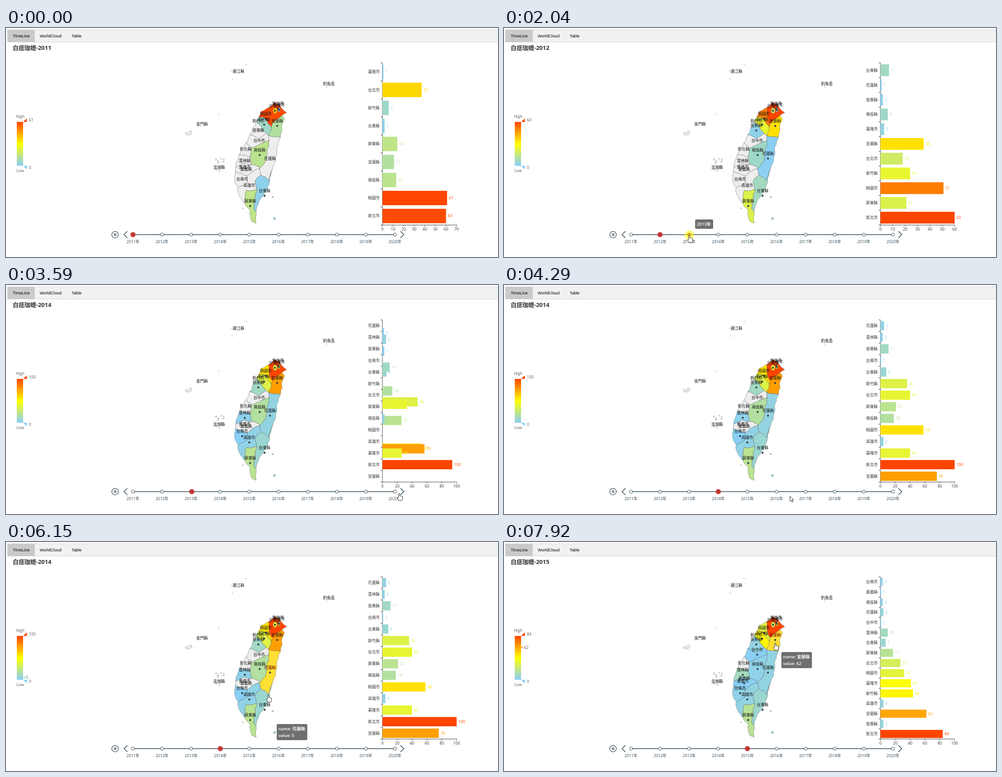
Write an HTML page that moves like this. It is 1094 by 512 pixels and loops after 8 s.

```html
<!DOCTYPE html>
<html lang="zh-Hant">
<head>
<meta charset="utf-8">
<title>Timeline map</title>
<style>
html, body { margin: 0; width: 100%; height: 100%; overflow: hidden; background: #fff; }
svg { display: block; width: 100%; height: 100%; }
text { font-family: "Open Sans", "Noto Sans CJK TC", "Noto Sans CJK SC", "Noto Sans CJK JP", sans-serif; font-size: 8.7px; }
.tab { font-family: "Liberation Sans", Arial, sans-serif; font-size: 9.3px; }
.title { font-size: 13px; font-weight: 700; }
.tip { font-size: 9.5px; font-weight: 600; }
</style>
</head>
<body>
<svg viewBox="0 0 1094 512">
  <defs><linearGradient id="scale" x1="0" y1="1" x2="0" y2="0">
    <stop stop-color="#87cefa"/><stop offset=".5" stop-color="#ff0"/><stop offset="1" stop-color="#ff4500"/>
  </linearGradient></defs>
  <g id="frame"></g><g id="year"></g><g id="bars"></g><g id="top"></g>
</svg>
<script>
const LOOP = 8000, INK = '#304654', MID = 'text-anchor="middle"';
const layer = id => document.getElementById(id);

// Start time and rows from top to bottom; the axis follows from the largest value
const years = [
  [0, '基隆1 台北37 新竹6 台東2 屏東14 宜蘭11 南投13 桃園61 新北60'],
  [500, '台東7 花蓮1 苗栗2 南投6 基隆3 宜蘭35 台北18 新竹24 桃園51 屏東21 新北60'],
  [2110, '雲林1 台南5 南投6 花蓮5 台東2 高雄1 苗栗8 宜蘭27 台北22 新竹65 屏東33 基隆5 新北85 桃園44'],
  [3511, '花蓮5 雲林3 苗栗11 台南1 台東8 新竹36 台北40 屏東21 南投18 桃園58 高雄4 基隆40 新北100 宜蘭76'],
  [7511, '台南3 嘉義1 南投3 花蓮4 台中1 雲林10 台東7 屏東17 台北27 桃園32 基隆41 新竹44 高雄4 宜蘭62 苗栗4 新北84']
].map(([start, list], i) => {
  const rows = list.split(' ').map(s => ({ name: s.slice(0, 2), value: +s.slice(2) }));
  const max = Math.max(...rows.map(r => r.value)), step = max > 80 ? 20 : 10;
  const value = Object.fromEntries(rows.map(r => [r.name, r.value]));
  return { start, rows, max, step, value, axis: Math.ceil(max / step) * step, gap: 362.5 / rows.length, label: 2011 + i };
});
// Bars created later lie on top
const paintOrder = [...new Set(years.flatMap(y => [...y.rows].reverse().map(r => r.name)))];

// Border corners, named A-Z, a-z, 0-5 in this order: the coast clockwise, then inland
const corners = `584,178 600,167 612,178 624,190 614,195 619,203 613,218 610,245 602,275 592,317 586,345 572,374 556,411
 556,437 547,433 543,408 531,392 517,372 516,358 509,344 510,320 511,311 518,284 534,256 542,238 557,208 562,199 567,187
 577,202 590,222 592,214 585,197 603,204 584,240 579,236 567,219 560,248 585,251 566,259 546,269 543,288 545,305 561,309
 564,314 580,290 570,308 567,328 583,341 555,340 558,362 551,404 537,331 537,345 535,363 529,302 580,272 553,388`
  .split(/\s+/).map(p => p.split(',').map(Number));
const names = 'ABCDEFGHIJKLMNOPQRSTUVWXYZabcdefghijklmnopqrstuvwxyz012345';

// Label place, then corners of the border or the radius of a city
const regions = {
  苗栗: [561, 229, 'ZYkij'], 台中: [563, 252, 'YXnmlhik'], 彰化: [533, 271, 'XWon'], 雲林: [531, 297, 'WV2po'],
  嘉義: [534, 316, 'VUzrqp2'], 台南: [525, 338, 'UTS0z'], 高雄: [541, 352, 'SRQ1xwurz0'], 南投: [564, 284, 'nml3strqpo'],
  新竹: [574, 216, 'aZjihdc'], 桃園: [578, 203, 'Abacdef'], 新北: [605, 180, 'ABCDEgef'], 宜蘭: [603, 219, 'EFGHhdeg'],
  花蓮: [587, 292, 'hHIJvurts3l'], 台東: [575, 375, 'uvJKLMy4xw'], 屏東: [543, 398, 'QPONMy4x1'],
  台北: [598, 185, 6.5], 基隆: [607, 183, 4.5]
};
const spots = { 新竹市: [561, 208], 嘉義市: [531, 311], 澎湖縣: [474, 312], 金門縣: [436, 215], 連江縣: [517, 97], 釣魚島: [718, 125] };
const fullName = n => n + ('基隆台北台南台中高雄桃園新北'.includes(n) ? '市' : '縣');

const text = (x, y, s, attr = '') => `<text x="${x}" y="${y}" dy=".36em" ${attr}>${s}</text>`;
const rect = (x, y, w, h, attr) => `<rect x="${x}" y="${y}" width="${w}" height="${h}" ${attr}/>`;
const dot = (x, y, r, attr) => `<circle cx="${x}" cy="${y}" r="${r}" ${attr}/>`;
const path = (d, attr) => `<path d="${d}" ${attr}/>`;

const stops = [[135, 206, 250], [255, 255, 0], [255, 69, 0]];
function heat(u) {
  const i = u < 0.5 ? 0 : 1, k = u * 2 - i;
  return `rgb(${stops[i].map((c, j) => Math.round(c + (stops[i + 1][j] - c) * k))})`;
}

const noise = (x, y) => { const v = Math.sin(x * 12.9898 + y * 78.233) * 43758.5453; return v - Math.floor(v) - 0.5; };

// Roughen an edge the same way for both neighbours
function rough(a, b, depth) {
  if (!depth) return [b];
  const [p, q] = a[0] < b[0] || (a[0] === b[0] && a[1] < b[1]) ? [a, b] : [b, a];
  const k = noise(p[0] + q[0], p[1] + q[1]) * 0.22;
  const m = [(p[0] + q[0]) / 2 - (q[1] - p[1]) * k, (p[1] + q[1]) / 2 + (q[0] - p[0]) * k];
  return [...rough(a, m, depth - 1), ...rough(m, b, depth - 1)];
}

const ring = (x, y, r) => [0, 1, 2, 3, 4, 5].map(i => [x + r * 0.75 * Math.cos(i * Math.PI / 3), y + r * Math.sin(i * Math.PI / 3)]);

function outline([x, y, border]) {
  const pts = typeof border === 'number' ? ring(x, y, border) : [...border].map(c => corners[names.indexOf(c)]);
  const line = pts.flatMap((p, i) => rough(p, pts[(i + 1) % pts.length], 3));
  return 'M' + line.map(p => p.map(v => v.toFixed(1)).join()).join('L') + 'Z';
}
const shapes = Object.fromEntries(Object.entries(regions).map(([n, r]) => [n, outline(r)]));

const pointX = i => 282.3 + 64.73 * i;

function drawFrame() {
  let s = rect(3.5, 4, 1095, 27.5, 'fill="#f0f1f1" stroke="#ccc" stroke-width=".8"') + rect(3, 4, 61, 27.5, 'fill="#c9cbcb"');
  [['TimeLine', 15], ['WorldCloud', 75], ['Table', 146]].forEach(([n, x]) => s += text(x, 17.8, n, 'class="tab"'));

  s += rect(24, 210, 14, 98, 'fill="url(#scale)"');
  s += path('M38 210L46.5 202V210Z', 'fill="#ff4500"') + path('M38 308H46.5V316Z', 'fill="#87cefa"');
  s += text(31.5, 198, 'High', MID + ' fill="#555"') + text(31.5, 319, 'Low', MID + ' fill="#555"') + text(51, 312, 0, 'fill="#555"');

  s += path('M282 462H865', `stroke="${INK}" stroke-width="1.5"`);
  for (let i = 0; i < 10; i++) {
    s += dot(pointX(i), 462, 3.5, `fill="#fff" stroke="${INK}"`);
    s += text(pointX(i), 477.5, 2011 + i + '年', MID + ` fill="${INK}"`);
  }
  s += dot(242.5, 462, 7.2, `fill="none" stroke="${INK}" stroke-width="1.3"`);
  s += path('M241 459V465M244.2 459V465', `stroke="${INK}" stroke-width="1.6"`);
  s += path('M270 454.5L262.5 462L270 469.5M877 454.5L884.5 462L877 469.5', `fill="none" stroke="${INK}" stroke-width="1.5"`);
  layer('frame').innerHTML = s;
}

function drawIslands(fill) {
  const isle = (x, y, r, c = '#eee') => dot(x, y, r, `fill="${c}" stroke="#666" stroke-width=".5"`);
  let s = path('M398 235L402 233 405 236 409 230 413 231 413 236 408 239 401 239Z', 'fill="#eee" stroke="#666" stroke-width=".5"');
  for (let i = 0; i < 12; i++) s += isle(476 + noise(i, 3) * 20, 306 + noise(i, 8) * 28, 0.5 + Math.abs(noise(i, 5)) * 2.5);
  for (const [x, y] of [[534, 82], [502, 97], [503, 114], [473, 193], [713, 132], [727, 119]]) s += isle(x, y, 0.7);
  return s + isle(593, 378, 1.4, fill('台東')) + isle(597, 426, 2.4, fill('台東')) + isle(527, 403, 1, fill('屏東'));
}

function drawYear(y, hover) {
  const fill = n => n === hover ? '#ffdf33' : n in y.value ? heat(y.value[n] / y.max) : '#eee';
  let s = text(15, 44.5, `白痣珈蟌-${y.label}`, 'class="title" fill="#333"') + text(51, 205.5, y.max, 'fill="#555"');

  s += drawIslands(fill);
  for (const n in shapes) s += path(shapes[n], `fill="${fill(n)}" stroke="#555" stroke-width=".5" stroke-linejoin="round"`);
  let labels = '';
  for (const n in regions) {
    const [x, cy] = regions[n], known = n in y.value;
    if (known) s += dot(x, cy, 2.2, 'fill="#3b4148"');
    labels += text(x, known ? cy - 11 : cy, fullName(n), MID + ` fill="${n === hover ? '#640000' : '#111'}"`);
  }
  s += labels;
  for (const n in spots) s += text(...spots[n], n, MID + ' fill="#111"');

  if (hover) {
    const v = y.value[hover], iy = 308 - 98 * v / y.max;
    s += path(`M38 ${iy}L42 ${iy - 3}V${iy + 3}Z`, `fill="${heat(v / y.max)}"`) + text(44.5, iy, v, 'fill="#555"');
  }

  let d = 'M837 78V440.5H1002';
  for (let i = 0; i <= y.rows.length; i++) d += `M833 ${78 + i * y.gap}H837`;
  for (let v = 0; v <= y.axis; v += y.step) {
    const x = 837 + 165 * v / y.axis;
    d += `M${x} 440V444`;
    s += text(x, 450, v, MID + ' fill="#333"');
  }
  s += path(d, 'fill="none" stroke="#333" stroke-width=".9"');
  y.rows.forEach((r, i) => s += text(831, 78 + (i + 0.5) * y.gap, fullName(r.name), 'text-anchor="end" fill="#333"'));
  layer('year').innerHTML = s;
}

function bar(y, name) {
  const i = y ? y.rows.findIndex(r => r.name === name) : -1;
  return i < 0 ? null : { y: 78 + (i + 0.5) * y.gap, h: y.gap * 0.8, w: 165 * y.rows[i].value / y.axis };
}

function drawBars(y, last, t) {
  const k = 1 - (1 - Math.min(1, (t - y.start) / 300)) ** 3;
  let s = '', labels = '';
  for (const n of paintOrder) {
    const to = bar(y, n);
    if (!to) continue;
    const from = bar(last, n) || { ...to, w: last ? 0 : to.w };
    const mix = f => from[f] + (to[f] - from[f]) * k;
    const w = mix('w'), h = mix('h'), cy = mix('y'), color = `fill="${heat(y.value[n] / y.max)}"`;
    s += rect(837, cy - h / 2, w, h, color);
    labels += text(837 + w + 4, cy, y.value[n], color);
  }
  layer('bars').innerHTML = s + labels;
}

// Cursor moves: from time, to time, goal
const moves = [
  [500, 1270, 385, 465], [1350, 1500, 402, 462], [1730, 1880, 412, 464], [2300, 3110, 874, 466], [3680, 4290, 636, 472],
  [4290, 4620, 548, 408], [4620, 4980, 569, 376], [5150, 5390, 643, 383], [5539, 5540, 597, 382], [6000, 6140, 583, 342],
  [6200, 6770, 601, 261], [7520, 7780, 610, 216], [7800, 7910, 603, 226]
];
const hovers = [[4450, 4800, '屏東'], [6060, 7720, '花蓮'], [7720, LOOP, '宜蘭']];
const handTimes = [[1850, 2250], [3050, 3720], ...hovers];
const within = (list, t) => list.find(([a, b]) => t >= a && t < b);

function cursorAt(t) {
  let x = 395, y = 516;
  for (const [a, b, gx, gy] of moves) {
    const u = Math.max(0, Math.min(1, (t - a) / (b - a))), e = u * u * (3 - 2 * u);
    x += (gx - x) * e;
    y += (gy - y) * e;
  }
  return [x, y];
}

const ARROW = 'M0 0V11.5L2.6 9.2L4.5 13.4L6.4 12.6L4.6 8.5H8.2Z';
const HAND = 'M-1.3 9V1.2Q-1.3 0 0 0T1.3 1.2V5.5Q2.5 4.8 3.6 6Q5 5.4 5.8 6.7Q7.6 6.4 7.6 8V11Q7.6 13 6 16H-.3Q-1 14-4 10.5Q-3.8 8.3-1.3 9Z';

function tooltip(x, y, w, h, lines) {
  return rect(x, y, w, h, 'rx="2.5" fill="#323232" fill-opacity=".7"') +
    lines.map((l, i) => text(x + 3.7, y + 11 + i * 14.3, l, 'class="tip" fill="#fff"')).join('');
}

function drawTop(index, y, hover, t) {
  const u = index ? Math.min(1, (t - y.start) / 300) : 1;
  const e = u < 0.5 ? 16 * u ** 5 : 1 - 16 * (1 - u) ** 5;
  let s = dot(pointX(index - 1 + e), 462, 5, 'fill="#c23531" stroke="#c23531" stroke-opacity=".5" stroke-width="2.6"');

  if (t >= 1880 && t < 2250) {
    if (index === 1) s += dot(pointX(2), 462, 4, 'fill="#c23531"');
    if (t >= 1980 && t < 2140) s += dot(412, 463, 10.5, 'fill="#ff0" fill-opacity=".55"');
    s += tooltip(425, 428, 40, 21, ['2013年']);
  }
  if (hover) {
    const [x, cy] = cursorAt(t - 120);
    s += tooltip(x + 6.7, cy + 30, 68, 36, ['name: ' + fullName(hover), 'value: ' + y.value[hover]]);
  }
  if (t >= 500) s += path(within(handTimes, t) ? HAND : ARROW, `transform="translate(${cursorAt(t)})" fill="#fff" stroke="#111" stroke-width=".9" stroke-linejoin="round"`);
  layer('top').innerHTML = s;
}

let shown = '';
function render(t) {
  const index = years.findLastIndex(y => t >= y.start), y = years[index];
  const hover = (within(hovers, t) || [])[2], key = index + (hover || '');
  if (key !== shown) drawYear(y, hover);
  shown = key;
  drawBars(y, years[index - 1], t);
  drawTop(index, y, hover, t);
}

drawFrame();
const begin = performance.now();
function tick() {
  render((performance.now() - begin) % LOOP);
  requestAnimationFrame(tick);
}
tick();
</script>
</body>
</html>
```
